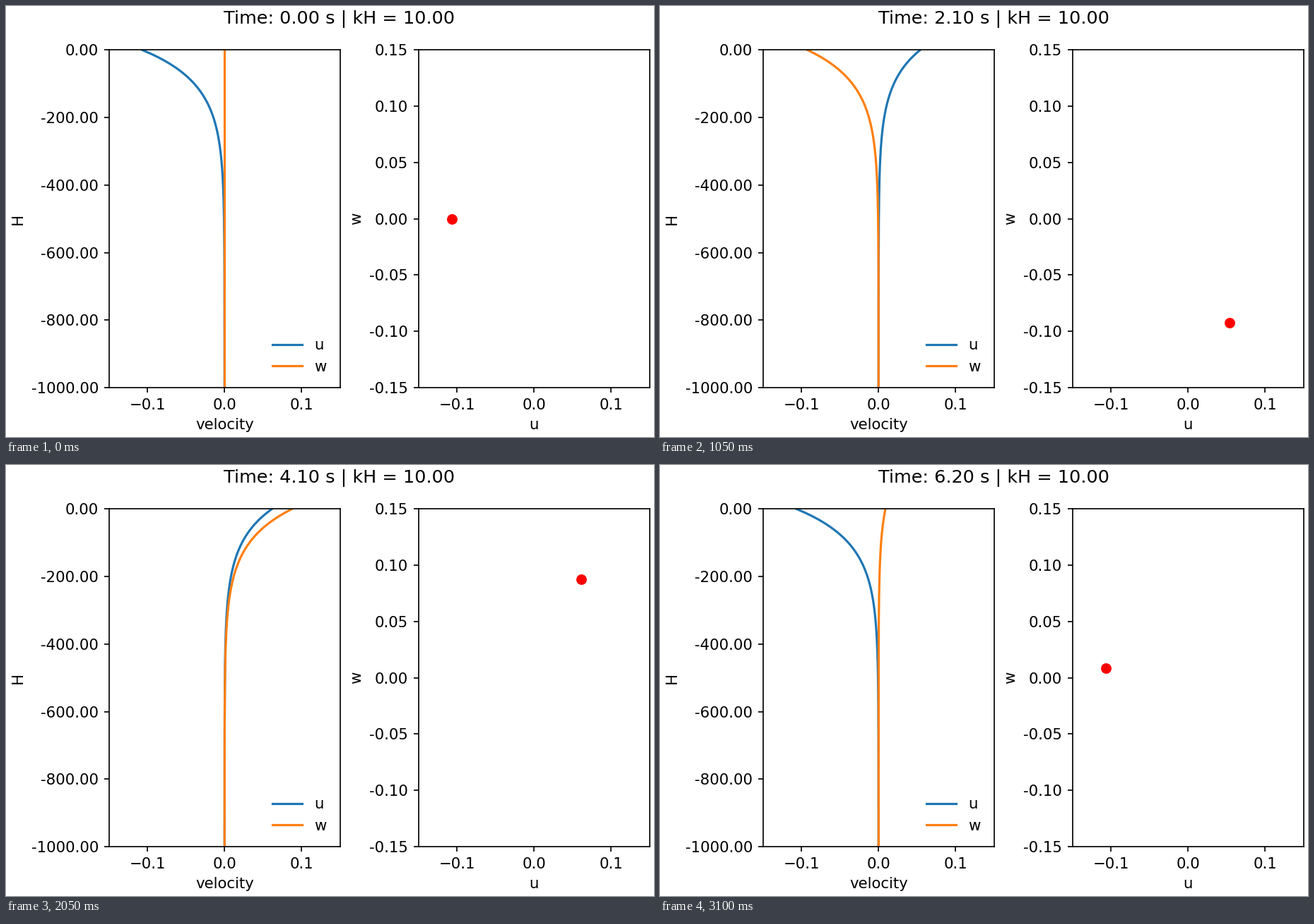
A matplotlib script for the animation above (3.15 s loop, 917x611 px).

```python
import numpy as np
import matplotlib.pyplot as plt
from matplotlib.animation import FuncAnimation
from matplotlib.ticker import FormatStrFormatter, MultipleLocator

W, H = 917, 611
DPI = W / 6
FRAMES, INTERVAL = 63, 50
DT = 0.1            # simulated seconds per step
AMP = 0.107         # surface orbital speed
DEPTH, KH = 1000, 10
LIM = 0.15

plt.rcParams.update({"font.family": "DejaVu Sans", "font.size": 10})

# The small epsilon keeps the pixel size from truncating downwards.
fig = plt.figure(figsize=((W + 0.001) / DPI, (H + 0.001) / DPI), dpi=DPI,
                 facecolor="white")


def add_panel(left, right, xlabel, ylabel, ylim, ystep):
    top, bottom = 62.4, 541.0
    ax = fig.add_axes([left / W, 1 - bottom / H,
                       (right - left) / W, (bottom - top) / H])
    ax.set(xlim=(-LIM, LIM), ylim=ylim, xlabel=xlabel, ylabel=ylabel)
    ax.xaxis.set_major_locator(MultipleLocator(0.1))
    ax.yaxis.set_major_locator(MultipleLocator(ystep))
    ax.yaxis.set_major_formatter(FormatStrFormatter("%.2f"))
    return ax


profile = add_panel(146.0, 472.6, "velocity", "H", (-DEPTH, 0), 200)
orbit = add_panel(584.0, 910.6, "u", "w", (-LIM, LIM), 0.05)
orbit.set_yticks(np.arange(-3, 4) * 0.05 + 0.0)

z = np.linspace(-DEPTH, 0, 400)
decay = AMP * np.exp(KH * z / DEPTH)

u_line, = profile.plot([], [], color="tab:blue", label="u")
w_line, = profile.plot([], [], color="tab:orange", label="w")
profile.legend(loc="lower right", frameon=False)
dot, = orbit.plot([], [], "ro")
title = fig.text(472 / W, 1 - 6.4 / H, "", ha="center", va="top", fontsize=12)


def update(i):
    t = i * DT
    u, w = -decay * np.cos(t), -decay * np.sin(t)
    u_line.set_data(u, z)
    w_line.set_data(w, z)
    dot.set_data([u[-1]], [w[-1]])
    title.set_text(f"Time: {t:.2f} s | kH = {KH:.2f}")
    return u_line, w_line, dot, title


anim = FuncAnimation(fig, update, frames=FRAMES, interval=INTERVAL,
                     init_func=lambda: update(0), repeat=True, repeat_delay=0)
plt.show()
```
